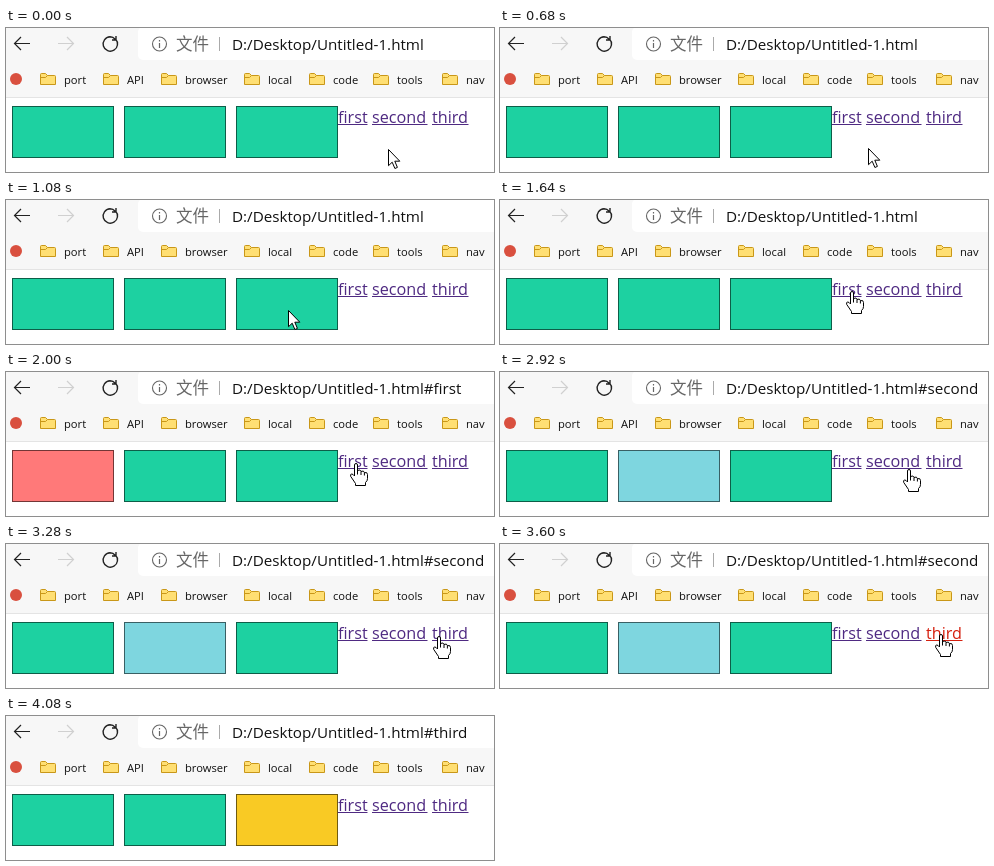
These frames come from a looping animation (488x144 px, 4.56 s). An HTML page:

```html
<!DOCTYPE html>
<html lang="en">
<head>
<meta charset="utf-8">
<title>Target links</title>
<style>
html, body { margin: 0; width: 100%; height: 100%; overflow: hidden; background: #fff; }
svg { display: block; width: 488px; height: 144px; }
text { font-family: "Open Sans", "Noto Sans CJK SC", "Noto Sans CJK", sans-serif; }
.line { fill: none; stroke: #222; stroke-width: 1.2; }
.mark { font-size: 11.2px; fill: #111; }
.link { font-size: 16.2px; }
</style>
</head>
<body>
<svg id="stage" viewBox="0 0 488 144">
  <rect width="488" height="70" fill="#f7f7f7"/>
  <path d="M0 69.5H488" stroke="#e4e4e4"/>
  <rect x="132" y="-1" width="380" height="33" rx="5" fill="#fff"/>
  <path class="line" d="M24 15.5H8.5M15 9L8.5 15.5L15 22"/>
  <path class="line" style="stroke:#d0d0d0" d="M52 15.5H67.5M61 9L67.5 15.5L61 22"/>
  <path class="line" style="stroke-width:1.4" d="M109.5 11A7.2 7.2 0 1 1 104 8.8Q107 8.8 109.5 11.5M110 8V12H106"/>
  <circle class="line" cx="153.5" cy="16" r="7" style="stroke:#666;stroke-width:1.1"/>
  <path d="M153.5 15V20M153.5 12V13.4" stroke="#666" stroke-width="1.2"/>
  <text x="170" y="22" font-size="16.5" fill="#666">文件</text>
  <path d="M213.5 9V23" stroke="#aaa"/>
  <text id="url" x="226" y="22" font-size="15.2" fill="#111"></text>
  <circle cx="10" cy="51" r="6" fill="#d9503f"/>
  <g id="marks"></g>
  <g id="boxes"></g>
  <g id="links"></g>
  <g id="arrow" fill="#fff" stroke="#000" stroke-linejoin="miter">
    <path d="M.5 .5V16.7L4.2 13.2L6.9 19.5L9.4 18.4L6.8 12.2H11.8Z"/>
  </g>
  <g id="hand" fill="#fff" stroke="#000" stroke-linejoin="round">
    <path d="M-1.5 13V2Q-1.5 .5 0 .5T1.5 2V7.5Q4.5 6 5 8.4Q8 7.2 8.4 9.6Q11.5 8.8 11.5 11.5V15.5Q11.5 18 9.5 19.5V22.5H-.5V20.5L-5.3 13.4Q-6 11 -4.2 11Q-3 11 -1.5 13Z"/>
    <path d="M1.5 7V11.5M5 8.4V12M8.4 9.6V12.5" fill="none"/>
  </g>
</svg>
<script>
const NS = "http://www.w3.org/2000/svg";
const $ = id => document.getElementById(id);

function add(parent, tag, attrs, text) {
  const el = document.createElementNS(NS, tag);
  for (const k in attrs) el.setAttribute(k, attrs[k]);
  if (text) el.textContent = text;
  parent.appendChild(el);
  return el;
}

const LOOP = 4560, STEP = 40;
const GREEN = "#1dd1a1", PURPLE = "#4f2a82", ACTIVE = "#d5200f";

const folders = [["port", 34], ["API", 97], ["browser", 155], ["local", 238],
                 ["code", 303], ["tools", 367], ["nav", 436]];
for (const [name, x] of folders) {
  const g = add($("marks"), "g", { transform: `translate(${x} 45)` });
  add(g, "path", { d: "M.5 11.5V1.5Q.5 .5 1.5 .5H5.5L7.5 2.5H14.5Q15.5 2.5 15.5 3.5V11.5Z", fill: "#ffdf73", stroke: "#c99718" });
  add(g, "path", { d: "M.5 4.5H5.5L7.5 2.5", fill: "none", stroke: "#c99718" });
  add(g, "text", { x: 24, y: 10.5, class: "mark" }, name);
}

// Each link lights its own box when the mouse is released.
const items = [
  { name: "first", x: 332, w: 29, color: "#ff7979", press: 1880, release: 2000 },
  { name: "second", x: 366, w: 55, color: "#7ed6df", press: 2640, release: 2760 },
  { name: "third", x: 426, w: 36, color: "#f9ca24", press: 3600, release: 3720 }
];
items.forEach((it, i) => {
  const x = 6 + 112 * i;
  it.box = add($("boxes"), "rect", { x, y: 78, width: 102, height: 52 });
  add($("boxes"), "rect", { x: x + .5, y: 78.5, width: 101, height: 51, fill: "none", stroke: "#000", "stroke-opacity": .55 });
  it.link = add($("links"), "g", {});
  add(it.link, "text", { x: it.x, y: 95, class: "link" }, it.name);
  add(it.link, "rect", { x: it.x, y: 96, width: it.w + .5, height: 1 });
});

// time, x, y of the pointer tip
const path = [
  [0, 382, 121], [560, 382, 121], [1080, 282, 110], [1160, 282, 110],
  [1600, 351, 91], [1640, 352, 91], [2000, 350, 91], [2320, 352, 91],
  [2520, 391, 92], [2640, 397, 93], [2760, 398, 93], [2880, 409, 97],
  [3000, 409, 97], [3400, 440, 91], [3560, 441, 90], [3720, 441, 90],
  [3960, 452, 120], [4080, 460, 146], [LOOP, 460, 146]
];

function pointer(t) {
  let i = 1;
  while (i < path.length - 1 && path[i][0] < t) i++;
  const [t0, x0, y0] = path[i - 1], [t1, x1, y1] = path[i];
  const u = (t - t0) / (t1 - t0), e = u * u * (3 - 2 * u);
  return [x0 + (x1 - x0) * e, y0 + (y1 - y0) * e];
}

function draw(t) {
  const current = items.filter(it => t >= it.release).pop();
  $("url").textContent = "D:/Desktop/Untitled-1.html" + (current ? "#" + current.name : "");
  for (const it of items) {
    it.box.setAttribute("fill", it === current ? it.color : GREEN);
    it.link.setAttribute("fill", t >= it.press && t < it.release ? ACTIVE : PURPLE);
  }
  const [x, y] = pointer(t).map(Math.round);
  const over = y > 78 && y < 102 && items.some(it => x >= it.x && x <= it.x + it.w);
  for (const id of ["arrow", "hand"]) {
    $(id).setAttribute("transform", `translate(${x} ${y})`);
    $(id).style.display = over === (id === "hand") ? "" : "none";
  }
}

const start = performance.now();
function tick() {
  const t = (performance.now() - start) % LOOP;
  draw(Math.floor(t / STEP) * STEP);
  requestAnimationFrame(tick);
}
draw(0);
requestAnimationFrame(tick);
</script>
</body>
</html>
```
